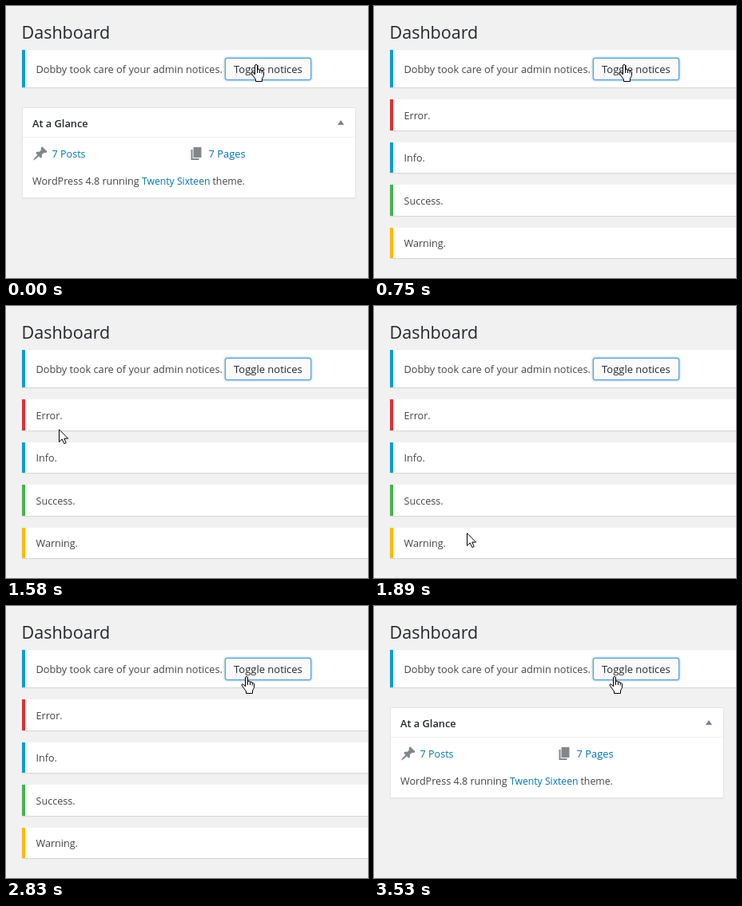
Recreate the animation shown at these times as an HTML page with a canvas. Size 453 px wide and 341 px high, loop 3.99 s.

```html
<!DOCTYPE html>
<html lang="en">
<head>
<meta charset="utf-8">
<title>Toggle notices</title>
<style>
  html, body { margin: 0; width: 100%; height: 100%; overflow: hidden; background: #f1f1f1; }
  canvas { display: block; width: 453px; height: 341px; }
</style>
</head>
<body>
<canvas id="stage"></canvas>
<script>
const W = 453, H = 341, LOOP = 3990;
const canvas = document.getElementById('stage');
const ctx = canvas.getContext('2d');
const ratio = window.devicePixelRatio || 1;
canvas.width = Math.round(W * ratio);
canvas.height = Math.round(H * ratio);

const INK = '#444', DARK = '#23282d', LINK = '#0073aa', ICON = '#82878c';
const BLUE = '#00a0d2';
const BUTTON = { x: 274, y: 65, w: 108, h: 28 };

const PIN = new Path2D('M10.44 3.02l1.82-1.82 6.36 6.35-1.83 1.82c-1.05-.68-2.48-.57-3.41.36l-.75.75c-.92.93-1.04 2.35-.35 3.41l-1.83 1.82-2.41-2.41-2.8 2.79c-.42.42-3.38 2.71-3.8 2.29s1.86-3.39 2.28-3.81l2.79-2.79L4.1 9.36l1.83-1.82c1.05.69 2.48.57 3.4-.36l.75-.75c.93-.92 1.05-2.35.36-3.41z');
const PAGES = new Path2D('M6 15V2h10v13H6zm-1 1h8v2H3V5h2v11z');
const ARROW = new Path2D('M.5.8V16.5L4.2 13L6.8 18.6L9.2 17.6L6.8 12.1H11.6z');
const HAND = new Path2D('M5.5 13V2Q5.5.5 7 .5T8.5 2V7Q8.7 6 10 6T11.5 8Q12 7 13 7T14 9Q14.5 8 15.5 8.5T16.5 10V14.5L14.5 18V21.5H6.5V19L2 13Q.2 10.5 1.5 9.8T5.5 13z');
const KNUCKLES = new Path2D('M8.5 7V11M11.5 8V11M14.2 9V11.5');

// Each move runs along a cubic curve from the end of the one before
const REST = [312, 73];
const MOVES = [
  { from: 1030, to: 1480, steps: 7, curve: [[118, 165], [118, 145], [87, 146]] },
  { from: 1580, to: 2040, steps: 7, curve: [[-54, 190], [60, 348], [189, 256]] },
  { from: 2110, to: 2610, steps: 7, curve: [[248, 175], [248, 109], [279, 107]] },
  { from: 2710, to: 2830, steps: 3, curve: [[286, 101], [293, 95], [300, 88]] }
];

const NOTICES = [['Error.', '#dc3232'], ['Info.', BLUE], ['Success.', '#46b450'], ['Warning.', '#ffb900']];

const ease = p => p * p * (3 - 2 * p);

function bezier(a, b, c, d, u) {
  const v = 1 - u;
  return v * v * v * a + 3 * v * v * u * b + 3 * v * u * u * c + u * u * u * d;
}

function tipAt(t) {
  let tip = REST;
  for (const { from, to, steps, curve: [b, c, d] } of MOVES) {
    if (t < from) break;
    const step = Math.floor((t - from) / (to - from) * (steps - 1)) + 1;
    const u = ease(Math.min(1, step / steps));
    tip = tip.map((a, i) => Math.round(bezier(a, b[i], c[i], d[i], u)));
  }
  return tip;
}

function text(str, x, y, color = INK, size = 12.6, weight = 400) {
  ctx.font = `${weight} ${size}px "Open Sans", "Noto Sans", sans-serif`;
  ctx.fillStyle = color;
  ctx.fillText(str, x, y);
}

function rect(x, y, w, h, color) {
  ctx.fillStyle = color;
  ctx.fillRect(x, y, w, h);
}

function raised(x, y, w, h, color, alpha) {
  ctx.save();
  ctx.shadowColor = `rgba(0,0,0,${alpha})`;
  ctx.shadowOffsetY = ratio;
  ctx.shadowBlur = ratio;
  rect(x, y, w, h, color);
  ctx.restore();
}

function at(x, y, draw) {
  ctx.save();
  ctx.translate(x, y);
  draw();
  ctx.restore();
}

function icon(path, x, y) {
  at(x, y, () => {
    ctx.fillStyle = ICON;
    ctx.fill(path);
  });
}

function notice(top, bottom, color) {
  raised(20, top, W, bottom - top, '#fff', .1);
  rect(20, top, 4, bottom - top, color);
}

function button(pressed) {
  const { x, w, h } = BUTTON;
  const y = BUTTON.y + (pressed ? 1 : 0);
  const outer = new Path2D(), inner = new Path2D();
  outer.roundRect(x, y, w, h, 3);
  inner.roundRect(x + 1, y + 1, w - 2, h - 2, 2);

  ctx.save();
  if (!pressed) {
    ctx.shadowColor = 'rgba(0,115,170,.8)';
    ctx.shadowBlur = 3 * ratio;
  }
  ctx.fillStyle = pressed ? '#999' : '#5b9dd9';
  ctx.fill(outer);
  ctx.restore();

  ctx.fillStyle = pressed ? '#eee' : '#fafafa';
  ctx.fill(inner);
  if (pressed) {
    const shade = ctx.createLinearGradient(0, y + 1, 0, y + 5);
    shade.addColorStop(0, 'rgba(0,0,0,.2)');
    shade.addColorStop(1, 'rgba(0,0,0,0)');
    ctx.fillStyle = shade;
    ctx.fill(inner);
  }
  text('Toggle notices', x + 11, pressed ? 86 : 84, DARK, 13);
}

function glance() {
  raised(20, 127, 418, 114, '#e5e5e5', .04);
  rect(21, 128, 416, 112, '#fff');
  rect(21, 164, 416, 1, '#eee');
  text('At a Glance', 33, 152, DARK, 12.8, 600);
  ctx.fillStyle = '#75839b';
  ctx.fill(new Path2D('M415 149L419 143L423 149z'));

  icon(PIN, 33, 175);
  text('7 Posts', 57.5, 190, LINK);
  icon(PAGES, 228.5, 175);
  text('7 Pages', 253.5, 190, LINK, 12.9);

  text('WordPress 4.8 running', 33, 224);
  text('Twenty Sixteen', 170, 224, LINK, 12.2);
  text('theme.', 258.5, 224, INK, 12.3);
}

function noticeList() {
  NOTICES.forEach(([label, color], i) => {
    const top = 117 + 53.6 * i;
    notice(Math.round(top), Math.round(top + 38.6), color);
    text(label, 37.5, Math.round(top + 24.6));
  });
}

function cursor(t) {
  const [x, y] = tipAt(t);
  const over = x >= BUTTON.x && y < BUTTON.y + BUTTON.h;
  const path = over ? HAND : ARROW;
  at(over ? x - 6 : x, y, () => {
    ctx.lineJoin = 'round';
    ctx.lineWidth = 1;
    ctx.fillStyle = '#fff';
    ctx.strokeStyle = '#000';
    ctx.fill(path);
    ctx.stroke(path);
    if (over) ctx.stroke(KNUCKLES);
  });
}

function draw(t) {
  const pressed = (t >= 580 && t < 750) || (t >= 3310 && t < 3530);
  const open = t >= 750 && t < 3530;

  ctx.setTransform(ratio, 0, 0, ratio, 0, 0);
  rect(0, 0, W, H, '#f1f1f1');
  text('Dashboard', 19.5, 41, DARK, 21.5);
  notice(55, 102, BLUE);
  text('Dobby took care of your admin notices.', 37.5, 84, INK, 12.75);
  button(pressed);
  if (open) noticeList();
  else glance();
  cursor(t);
}

const start = performance.now();
function tick() {
  draw((performance.now() - start) % LOOP);
  requestAnimationFrame(tick);
}
tick();
</script>
</body>
</html>
```
